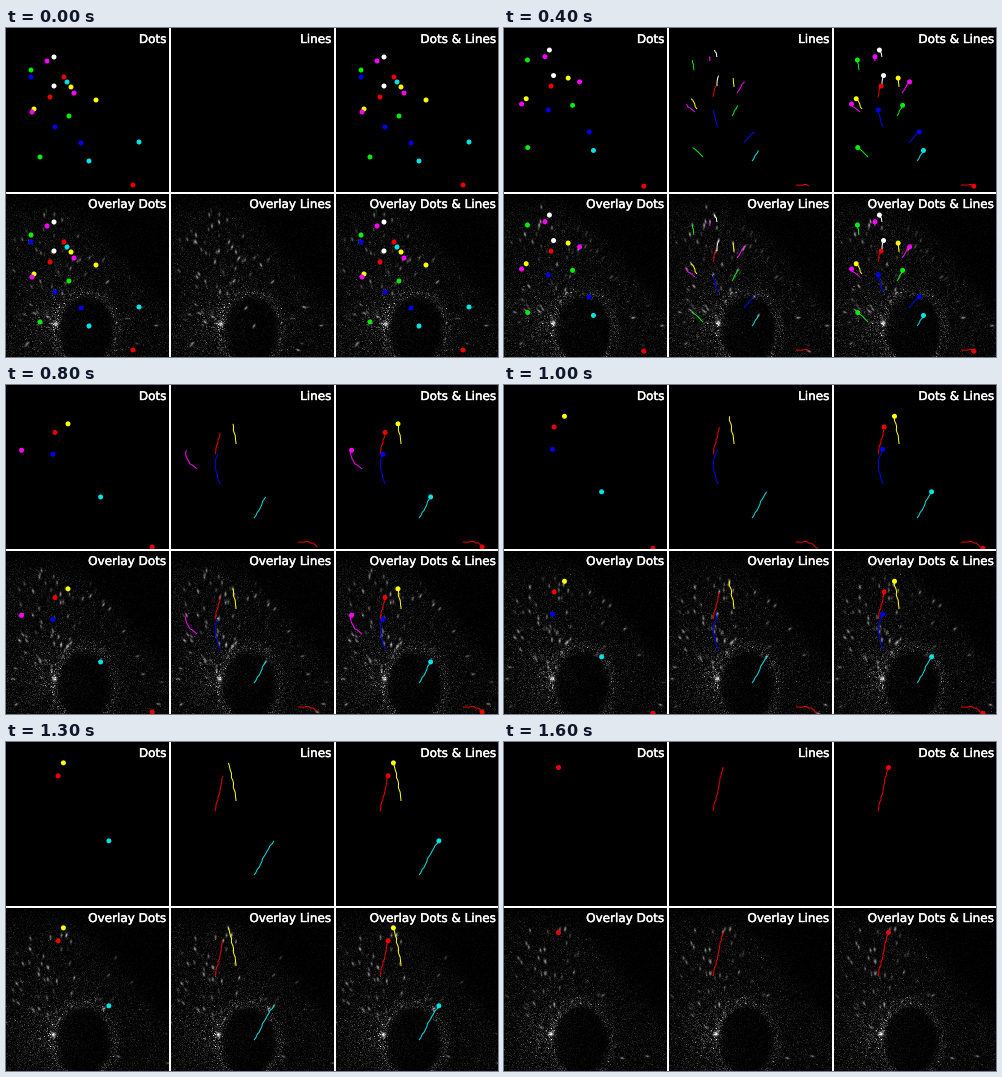
Recreate the animation shown at these times as a matplotlib script. Size 492 by 329 pixels, loop 1700 ms.

```python
import numpy as np
import matplotlib.pyplot as plt
from matplotlib import patheffects
from matplotlib.animation import FuncAnimation
from matplotlib.collections import LineCollection

W, H, DPI = 492, 329, 100
FRAMES, STEP_MS = 17, 100
PITCH = 165
PX = 72 / DPI  # one pixel in points

WHITE, MAGENTA, GREEN, BLUE = "#ffffff", "#ff00ff", "#00f000", "#0000f0"
RED, CYAN, YELLOW = "#f00000", "#00e4e4", "#ffff00"

rng = np.random.default_rng(7)
tracks = []


def add_track(color, start, last=5, end=None, bow=0, ease=1):
    """Move from start to end by step `last`, bowed sideways.

    Without an end the particle rises and fans out from x = 45.
    """
    start = np.array(start, float)
    if end is None:
        way = last * np.array([0.08 * (start[0] - 45), -2.7])
    else:
        way = end - start
    u = (np.arange(last + 1) / last)[:, None] ** ease
    side = np.array([-way[1], way[0]]) / np.hypot(*way)
    path = start + u * way + bow * np.sin(np.pi * u) * side
    path[1:-1] += rng.uniform(-0.6, 0.6, (last - 1, 2))
    tracks.append((color, path))


# Short-lived particles
add_track(WHITE, (48, 29), 6, end=(45, 18))
add_track(WHITE, (48, 58), 6)
add_track(MAGENTA, (41, 33), end=(41, 27))
add_track(MAGENTA, (68, 65))
add_track(GREEN, (25, 42), end=(23, 29))
add_track(GREEN, (63, 88), 6)
add_track(GREEN, (34, 129), end=(21, 117))
add_track(BLUE, (25, 49), 1)
add_track(BLUE, (75, 115), 6)
add_track(RED, (58, 49), 1)
add_track(CYAN, (61, 54), 1)
add_track(CYAN, (133, 114), 2, end=(139, 115))
add_track(YELLOW, (28, 81))
add_track(YELLOW, (90, 72), 3, end=(86, 62))

# Long-lived particles
add_track(MAGENTA, (26, 84), 9, end=(15, 62), bow=-4)
add_track(BLUE, (49, 99), 12, end=(52, 59), bow=-6, ease=0.8)
add_track(RED, (44, 69), 16, end=(54, 25))
add_track(RED, (127, 157), 12, end=(151, 166), bow=-4, ease=0.65)
add_track(CYAN, (83, 133), 14, end=(104, 96))
add_track(YELLOW, (65, 59), 15, end=(55, 13), bow=1, ease=1.3)

# Microscope picture: grain, nucleus, bright centre and drifting comets
yy, xx = np.mgrid[0:PITCH, 0:PITCH] + 0.5
HUB = np.array([50.0, 131.0])


def cell_mask(x, y):
    edge = 20 + 1.15 * (x - 75)
    right = 1 / (1 + np.exp(-(y - edge) / 6))
    return right / (1 + np.exp(-(y - 14) / 5))


def nucleus(x, y):
    return np.hypot((x - 80) / 27, (y - 138) / 34)


def make_comets(count):
    comets = []
    while len(comets) < count:
        p = rng.uniform((5, 15), (157, 162))
        crowd = 0.2 + np.exp(-((p[0] - 42) / 30) ** 2) * (p[1] < 120)
        keep = crowd * cell_mask(*p) * (nucleus(*p) > 1.1)
        if rng.random() < keep:
            way = (p - HUB) / np.hypot(*(p - HUB))
            birth, life = rng.uniform(-8, 17), rng.uniform(6, 11)
            comets.append((p, way, birth, life, rng.uniform(40, 150)))
    return comets


COMETS = make_comets(180)


def stamp(img, p, way, power):
    dx, dy = xx - p[0], yy - p[1]
    along, across = dx * way[0] + dy * way[1], dy * way[0] - dx * way[1]
    img += power * np.exp(-(along / 2) ** 2 - across ** 2)


def cell_image(k):
    grain = np.random.default_rng(100 + k)
    drift = np.array([-3.0, -4.0]) * k / (FRAMES - 1)
    x, y = xx - drift[0], yy - drift[1]
    r = nucleus(x, y)
    d = np.hypot(x - HUB[0], y - HUB[1])
    level = 2 + 6 * cell_mask(x, y)
    level += 14 * np.exp(-((r - 1.15) / 0.16) ** 2) + 26 * np.exp(-d / 22)
    level *= 0.3 + 0.7 / (1 + np.exp(-(r - 0.98) / 0.04))
    img = level * grain.exponential(1, level.shape)
    for p, way, birth, life, power in COMETS:
        age = (k - birth) / life
        if 0 <= age <= 1:
            fade = np.sin(np.pi * age) ** 0.5
            stamp(img, p + way * (age - 0.5) * life * 2, way, power * fade)
    for _, path in tracks:
        if k < len(path):
            way = path[-1] - path[0]
            stamp(img, path[k], way / np.hypot(*way), 140)
    img += 190 * np.exp(-(d / 2.2) ** 2)
    return np.clip(img, 0, 255)


fig = plt.figure(figsize=(W / DPI, H / DPI), dpi=DPI, facecolor="black")
images, dot_sets, line_sets = [], [], []
HEAVIER = [patheffects.withStroke(linewidth=0.4 * PX, foreground="white")]


def add_panel(col, row, name):
    x0, y0 = col * PITCH, row * PITCH
    w, h = min(PITCH, W - x0), min(PITCH, H - y0)
    ax = fig.add_axes([x0 / W, 1 - (y0 + h) / H, w / W, h / H])
    if row:
        images.append(ax.imshow(np.zeros((PITCH, PITCH)), cmap="gray",
                                vmin=0, vmax=255, aspect="auto",
                                interpolation="nearest",
                                extent=(0, PITCH, PITCH, 0)))
    if "Lines" in name:
        lines = LineCollection([], linewidths=PX, zorder=2)
        line_sets.append(ax.add_collection(lines))
    if "Dots" in name:
        dots = ax.scatter([], [], s=(5 * PX) ** 2, linewidths=0, zorder=3)
        dot_sets.append(dots)
    ax.text(160.5, 15, name, color="white", ha="right", va="baseline",
            family="DejaVu Sans", size=12 * PX, zorder=4,
            path_effects=HEAVIER)
    ax.set_xlim(0, w)
    ax.set_ylim(h, 0)
    ax.axis("off")


def add_bar(x, y, w, h):
    fig.add_artist(plt.Rectangle((x / W, 1 - (y + h) / H), w / W, h / H,
                                 facecolor="white", linewidth=0,
                                 antialiased=False, zorder=10))


for col, name in enumerate(("Dots", "Lines", "Dots & Lines")):
    add_panel(col, 0, name)
    add_panel(col, 1, "Overlay " + name)
    if col:
        add_bar(col * PITCH - 2, 0, 2, H)
add_bar(0, PITCH - 1, W, 2)


def draw(k):
    live = [(c, path[:k + 1]) for c, path in tracks if k < len(path)]
    colors = [c for c, _ in live]
    ends = [p[-1] for _, p in live]
    trails = [p if k else [p[0] - (0.4, 0), p[0] + (0.4, 0)] for _, p in live]
    picture = cell_image(k)
    for image in images:
        image.set_data(picture)
    for dots in dot_sets:
        dots.set_offsets(ends)
        dots.set_facecolors(colors)
    for lines in line_sets:
        lines.set_segments(trails)
        lines.set_colors(colors)
    return images + dot_sets + line_sets


anim = FuncAnimation(fig, draw, frames=FRAMES, interval=STEP_MS,
                     repeat=True, repeat_delay=0, blit=False)
plt.show()
```
